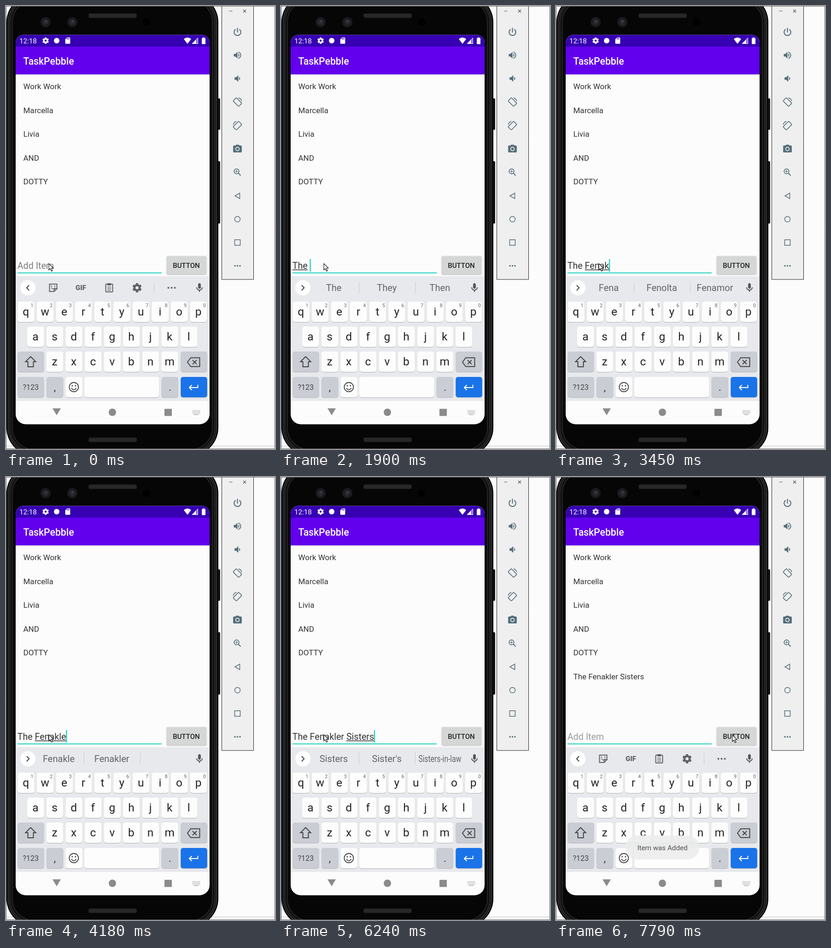
These frames come from a looping animation (584 px wide and 959 px high, 8000 ms). An HTML page with a canvas:

```html
<!DOCTYPE html>
<html lang="en">
<head>
<meta charset="utf-8">
<title>Adding an item to a list</title>
<style>
html, body { margin: 0; width: 100%; height: 100%; overflow: hidden; background: #fcfcfc; }
canvas { display: block; }
</style>
</head>
<body>
<canvas id="stage" width="584" height="959"></canvas>
<script>
const ctx = document.getElementById('stage').getContext('2d');
const LOOP = 8000;
const TAU = Math.PI * 2;
const PAPER = '#fcfcfc', INK = '#333333', GREY = '#5f6368', TEAL = '#1fd1c0', SLATE = '#546e7a';

// [time, field text, suggestions (null = icon toolbar), underline last word]
const STEPS = [
  [-940, '', null, 0],
  [1300, 'T', null, 0],
  [1420, 'T', ['T', 'The', 'This'], 1],
  [1540, 'Th', ['T', 'The', 'This'], 1],
  [1660, 'The', ['Th', 'The', 'This'], 1],
  [1780, 'The', ['The', 'They', 'Then'], 1],
  [1900, 'The ', ['The', 'They', 'Then'], 1],
  [2050, 'The F', ['same', 'first', 'best'], 0],
  [2330, 'The F', ['F', 'First', 'Fellow'], 1],
  [2730, 'The Fe', ['F', 'First', 'Fellow'], 1],
  [2850, 'The Fen', ['Fe', 'FE', 'Fennel'], 1],
  [2970, 'The Fen', ['Fen', 'Fence', 'Fennel'], 1],
  [3210, 'The Fena', ['Fen', 'Fence', 'Fennel'], 1],
  [3330, 'The Fena', ['Fena', 'Fenolta', 'Fenamor'], 1],
  [3450, 'The Fenak', ['Fena', 'Fenolta', 'Fenamor'], 1],
  [3570, 'The Fenak', ['Fenak', 'Fenolta', 'Fenamor'], 1],
  [3690, 'The Fenakl', ['Fenak', 'Fenolta', 'Fenamor'], 1],
  [3940, 'The Fenakle', ['Fenakl', 'Fenolta', 'Fenamor'], 1],
  [4060, 'The Fenakle', ['Fenakle', 'Fenakler', 'Fenamor'], 1],
  [4180, 'The Fenakle', ['Fenakle', 'Fenakler', ''], 1],
  [4330, 'The Fenakler', ['', 'Fenakler', ''], 1],
  [4630, 'The Fenakler ', ['', 'Fenakler', ''], 0],
  [4750, 'The Fenakler S', ['', 'Fenakler', ''], 1],
  [4870, 'The Fenakler S', ['S', 'A', 'So'], 1],
  [4990, 'The Fenakler Si', ['S', 'A', 'So'], 1],
  [5140, 'The Fenakler Sis', ['Si', 'SI', 'Since'], 1],
  [5390, 'The Fenakler Sist', ['Sis', 'SIS', 'Sister'], 1],
  [5640, 'The Fenakler Siste', ['Sist', 'Sister', 'Sisters'], 1],
  [5880, 'The Fenakler Sister', ['Sister', 'Sisters', "Sister's"], 1],
  [6120, 'The Fenakler Sisters', ['Sister', 'Sisters', "Sister's"], 1],
  [6240, 'The Fenakler Sisters', ['Sisters', "Sister's", 'Sisters-in-law'], 1],
  [7180, '', null, 0],
];
const POINTER = [[0, 92.5, 557], [6610, 203, 545], [6760, 346, 545], [6910, 382.5, 558]];
const ITEMS = ['Work Work', 'Marcella', 'Livia', 'AND', 'DOTTY'];
const ADDED = 'The Fenakler Sisters';

const ICONS = {
  power: 'M16.56 5.44l-1.45 1.45C16.84 7.94 18 9.83 18 12c0 3.31-2.69 6-6 6s-6-2.69-6-6c0-2.17 1.16-4.06 2.88-5.12L7.44 5.44C5.36 6.88 4 9.28 4 12c0 4.42 3.58 8 8 8s8-3.58 8-8c0-2.72-1.36-5.12-3.44-6.56zM13 3h-2v10h2z',
  louder: 'M3 9v6h4l5 5V4L7 9zm13.5 3c0-1.77-1.02-3.29-2.5-4.03v8.05c1.48-.73 2.5-2.25 2.5-4.02zM14 3.23v2.06c2.89.86 5 3.54 5 6.71s-2.11 5.85-5 6.71v2.06c4.01-.91 7-4.49 7-8.77s-2.99-7.86-7-8.77z',
  quieter: 'M18.5 12c0-1.77-1.02-3.29-2.5-4.03v8.05c1.48-.73 2.5-2.25 2.5-4.02zM5 9v6h4l5 5V4L9 9z',
  camera: 'M9 2L7.2 4H4c-1.1 0-2 .9-2 2v12c0 1.1.9 2 2 2h16c1.1 0 2-.9 2-2V6c0-1.1-.9-2-2-2h-3.2L15 2zM12 7a5 5 0 0 1 0 10a5 5 0 0 1 0-10zM12 8.8a3.2 3.2 0 0 0 0 6.4a3.2 3.2 0 0 0 0-6.4z',
  mic: 'M12 14c1.66 0 3-1.34 3-3V5c0-1.66-1.34-3-3-3S9 3.34 9 5v6c0 1.66 1.34 3 3 3zm5-3c0 2.76-2.24 5-5 5s-5-2.24-5-5H5c0 3.53 2.61 6.43 6 6.92V21h2v-3.08c3.39-.49 6-3.39 6-6.92z',
  card: 'M18 2h-8L4 8v12c0 1.1.9 2 2 2h12c1.1 0 2-.9 2-2V4c0-1.1-.9-2-2-2zM9 8h2V4H9zM12.2 8h2V4h-2zM15.4 8h2V4h-2z',
};
for (const name in ICONS) ICONS[name] = new Path2D(ICONS[name]);

const latest = (list, t) => list.filter(s => s[0] <= t).pop();

function box(x, y, w, h, r, fill, stroke, width = 1) {
  ctx.beginPath();
  ctx.roundRect(x, y, w, h, r);
  paint(fill, stroke, width);
}
function paint(fill, stroke, width = 1) {
  if (fill) { ctx.fillStyle = fill; ctx.fill(); }
  if (stroke) { ctx.strokeStyle = stroke; ctx.lineWidth = width; ctx.stroke(); }
}
function disc(x, y, r, fill, stroke, width) {
  ctx.beginPath();
  ctx.arc(x, y, r, 0, TAU);
  paint(fill, stroke, width);
}
// Points are relative to (x, y).
function poly(x, y, pts, fill, stroke, width, open) {
  ctx.beginPath();
  pts.forEach(([px, py]) => ctx.lineTo(x + px, y + py));
  if (!open) ctx.closePath();
  paint(fill, stroke, width);
}
const line = (x, y, pts, color, width) => poly(x, y, pts, null, color, width, true);
function text(s, x, y, size, color, { weight = 400, align = 'left', max } = {}) {
  ctx.font = `${weight} ${size}px Roboto, sans-serif`;
  ctx.textAlign = align;
  ctx.fillStyle = color;
  ctx.fillText(s, x, y, max);
}
function icon(name, x, y, size, color) {
  ctx.save();
  ctx.translate(x - size / 2, y - size / 2);
  ctx.scale(size / 24, size / 24);
  ctx.fillStyle = color;
  ctx.fill(ICONS[name], 'evenodd');
  ctx.restore();
}
function gear(x, y, r, color) {
  disc(x, y, r * .56, null, color, r * .46);
  for (let i = 0; i < 6; i++) {
    const a = i * TAU / 6 + TAU / 12, c = Math.cos(a), s = Math.sin(a);
    line(x, y, [[c * r * .7, s * r * .7], [c * r, s * r]], color, r * .5);
  }
}
function dots(x, y, gap, r, color) {
  for (let i = -1; i <= 1; i++) disc(x + i * gap, y, r, color);
}

function phone() {
  box(0, 0, 584, 959, 0, PAPER);
  line(0, 952.5, [[0, 0], [584, 0]], '#c4c4c4', 1);
  box(458, 200, 7, 68, 2, '#181818');
  box(458, 336, 7, 135, 2, '#181818');
  box(1, -25, 460, 998, 60, '#000');
  box(4.5, -21.5, 453, 991, 56, '#161616', '#3c3c3c', 1.5);
  box(8.5, -17.5, 445, 983, 52, '#111', '#333', 1.5);
  box(14, -12, 434, 972, 47, '#060606', '#2c2c2c', 1.5);
  for (const y of [16, 934]) {
    box(179, y, 105, 10, 4, '#222');
    for (let x = 182; x < 282; x += 3) box(x, y + 2, 1, 6, 0, '#333');
  }
  for (const x of [86, 144]) {
    disc(x, 35, 11, '#1b1b1f');
    disc(x, 35, 6, '#29292f');
    disc(x + 1, 33, 2.5, '#3b3b45');
  }
  disc(305, 35, 8, '#000');
}

function emulatorPanel() {
  const x = 502.5;
  box(468.5, -5, 69, 597, 0, '#efefef', '#222');
  line(488, 11, [[-3.5, 0], [3.5, 0]], '#555', 1);
  for (const k of [-1, 1]) line(518, 11, [[-3, -3 * k], [3, 3 * k]], '#555', 1.2);
  icon('power', x, 56.5, 25, SLATE);
  icon('louder', x, 106.5, 21.5, SLATE);
  icon('quieter', x, 157, 21.5, SLATE);
  [[208, 1], [259, -1]].forEach(([y, flip]) => {
    ctx.save();
    ctx.translate(x, y);
    ctx.scale(flip, 1);
    ctx.rotate(-TAU / 8);
    box(-5, -8.5, 10, 17, 1.5, null, SLATE, 1.7);
    ctx.beginPath();
    ctx.arc(0, 0, 9.5, -.55, .55);
    paint(null, SLATE, 1.4);
    ctx.restore();
  });
  icon('camera', x, 309.5, 22.5, SLATE);
  disc(500.5, 358, 5.3, null, SLATE, 1.7);
  line(500.5, 358, [[4, 4], [9, 9]], SLATE, 2);
  line(500.5, 358, [[-3, 0], [3, 0]], SLATE, 1.2);
  line(500.5, 358, [[0, -3], [0, 3]], SLATE, 1.2);
  poly(x, 411, [[-5.5, 0], [5, -6], [5, 6]], null, SLATE, 1.5);
  disc(x, 461.5, 6, null, SLATE, 1.5);
  box(x - 6, 506, 12, 12, 0, null, SLATE, 1.5);
  dots(x, 562.5, 5.5, 1.7, SLATE);
}

function statusBar() {
  box(21, 62.5, 421, 25.5, [17, 17, 0, 0], '#3700b3');
  box(21, 88, 421, 60, 0, '#6200ee');
  text('12:18', 29, 80.5, 15.2, '#fff');
  gear(86, 75, 7, '#fff');
  disc(110, 75, 6, '#fff');
  icon('card', 134, 75, 16, '#fff');
  ctx.beginPath();
  ctx.moveTo(394, 82);
  ctx.lineTo(386, 71.5);
  ctx.quadraticCurveTo(394, 65, 402, 71.5);
  paint('#fff');
  poly(417, 82, [[0, 0], [-13, 0], [0, -13.5]], 'rgba(255,255,255,.35)');
  poly(413, 82, [[0, 0], [-9, 0], [0, -9.3]], '#fff');
  line(417, 82, [[-.5, 0], [-.5, -13], [-13, -.5], [0, -.5]], '#fff', 1);
  box(425, 69.5, 8, 13, 1, '#fff');
  box(427, 68, 4, 2, 0, '#fff');
  text('TaskPebble', 37.5, 126.5, 21.2, '#fff', { weight: 500 });
}

function content(t, step) {
  const shade = ctx.createLinearGradient(0, 148, 0, 152);
  shade.addColorStop(0, 'rgba(0,0,0,.1)');
  shade.addColorStop(1, 'rgba(0,0,0,0)');
  box(21, 148, 421, 4, 0, shade);
  const items = t < 7180 ? ITEMS : [...ITEMS, ADDED];
  items.forEach((item, i) => text(item, 37.5, 180.3 + i * 51.5, 17.05, INK));

  const [since, value, , underlined] = step;
  const size = 19.65, x = 24.8, base = 569;
  if (value) text(value, x, base, size, INK);
  else text('Add Item', x, base, size, t < 120 ? '#7d7d7d' : '#9c9c9c');
  ctx.font = `400 ${size}px Roboto, sans-serif`;
  const width = s => ctx.measureText(s).width;
  if (underlined) {
    const word = value.trimEnd();
    const from = width(word.slice(0, word.lastIndexOf(' ') + 1));
    box(x + from, 570.6, width(word) - from, 1.4, 0, INK);
  }
  box(25, 576.8, 313, 2, 0, TEAL);
  if ((t - since) % 1060 < 530) box(x + width(value) - .3, 548, 2.3, 27, 0, TEAL);

  ctx.save();
  ctx.shadowColor = 'rgba(0,0,0,.3)';
  ctx.shadowBlur = 3;
  ctx.shadowOffsetY = 1;
  box(349, 541.5, 86, 39, 2, t >= 7060 && t < 7420 ? '#c4c5c5' : '#d5d6d6');
  ctx.restore();
  text('BUTTON', 391.5, 566.5, 15, '#222', { weight: 500, align: 'center' });
}

function toolbar(words) {
  const y = 610, dir = words ? 1 : -1;
  disc(47.5, y, 16.5, '#fff');
  line(47.5, y, [[-2.7 * dir, -5.5], [2.7 * dir, 0], [-2.7 * dir, 5.5]], '#444', 2);
  icon('mic', 420, y, 24, '#55585c');
  if (words) {
    if (words[0]) for (const x of [169.5, 291.5]) line(x, 597, [[0, 0], [0, 25]], '#c9cbd0', 1);
    words.forEach((w, i) => text(w, 114.5 + i * 115.2, 617, 20, GREY, { align: 'center', max: 93 }));
    return;
  }
  line(102.5, y, [[8, 2], [8, -8], [-8, -8], [-8, 8], [2, 8], [8, 2], [2, 2], [2, 8]], GREY, 2);
  disc(99, 606.5, 1.3, GREY);
  disc(106, 606.5, 1.3, GREY);
  ctx.beginPath();
  ctx.arc(102.5, 608.5, 4, .2, TAU / 2 - .2);
  paint(null, GREY, 1.6);
  text('GIF', 162.5, 615, 15, GREY, { weight: 900, align: 'center' });
  box(216.5, 602, 15, 17, 1.5, null, GREY, 2);
  box(220, 600, 8, 5, 1, GREY);
  for (const d of [-1.5, 2, 5.5]) line(224, y + d, [[-4, 0], [4, 0]], GREY, 1.4);
  gear(284.5, y, 10, GREY);
  line(321.5, 598, [[0, 0], [0, 24]], '#c9cbd0', 1);
  dots(359.5, y, 7, 2, GREY);
}

function key(x, y, w, fill = '#fdfdfd') {
  box(x, y + 1.3, w, 44, 5, '#b9bbc0');
  box(x, y, w, 44, 5, fill);
}

function keyboard(words, upper) {
  const dim = '#cacdd4', pitch = 41.6;
  box(21, 585, 421, 270, 0, '#e8e9ed');
  toolbar(words);
  [['qwertyuiop', 43.5, 640], ['asdfghjkl', 64.3, 694], ['zxcvbnm', 105.9, 748]].forEach(([row, x0, y]) => {
    [...row].forEach((c, i) => {
      const x = x0 + i * pitch;
      key(x - 18.3, y, 36.6);
      text(upper ? c.toUpperCase() : c, x - .3, y + 29.5, 24.5, '#222', { align: 'center' });
      if (y === 640) text((i + 1) % 10, x + 13, 652, 10.5, GREY, { align: 'center' });
    });
  });

  key(25.3, 748, 57.5, dim);
  poly(53.5, 770, [[0, -11], [11, 0], [6, 0], [6, 11], [-6, 11], [-6, 0], [-11, 0]], upper ? '#444' : null, '#444', 2);
  key(379.3, 748, 57.5, dim);
  poly(407, 771, [[-13, 0], [-6, -9.5], [13.5, -9.5], [13.5, 9.5], [-6, 9.5]], null, '#444', 2);
  for (const k of [-1, 1]) line(409.5, 771, [[-4.5, -4.5 * k], [4.5, 4.5 * k]], '#444', 2);

  key(25.3, 803, 57.5, dim);
  text('?123', 53.8, 831, 16, '#444', { align: 'center' });
  key(87.8, 803, 36.6, dim);
  text(',', 106, 833, 22, '#333', { align: 'center' });
  key(129.3, 803, 36.6);
  disc(147.3, 825, 10, null, '#444', 1.8);
  disc(143.8, 822, 1.5, '#444');
  disc(150.8, 822, 1.5, '#444');
  ctx.beginPath();
  ctx.arc(147.3, 825.5, 5.2, .25, TAU / 2 - .25);
  paint(null, '#444', 1.8);
  key(170, 803, 162.5);
  key(337.5, 803, 36.6, dim);
  text('.', 355.8, 833, 22, '#333', { align: 'center' });
  key(379.3, 803, 57.5, '#1a73e8');
  line(407, 826, [[9.5, -6], [9.5, 0], [-8, 0]], '#fff', 2);
  line(407, 826, [[-3.5, -5.5], [-9, 0], [-3.5, 5.5]], '#fff', 2);
}

function navBar() {
  const grey = '#8b8b8b';
  poly(110, 871, [[-9, 0], [9, 0], [0, 15]], grey);
  disc(231, 879.5, 8, grey);
  box(344, 872, 16, 15.5, 1, grey);
  for (let row = 0; row < 3; row++)
    for (let i = 0; i < 6; i++) box(405 + i * 2.9, 875 + row * 2.9, 1.7, 1.7, 0, '#aaa');
  box(408, 883.8, 10, 1.5, 0, '#aaa');
}

function toast(alpha) {
  ctx.globalAlpha = alpha;
  box(151, 776, 160, 52, 26, '#ebebec');
  text('Item was Added', 231, 807.5, 15.2, '#333', { align: 'center' });
  ctx.globalAlpha = 1;
}

function pointer([, x, y]) {
  poly(x, y, [[.5, .5], [.5, 14.5], [3.7, 11.5], [6, 17], [8.5, 16], [6.2, 10.7], [10.3, 10.4]], '#fff', '#111', 1.1);
}

function draw(t) {
  const step = latest(STEPS, t), words = step[2];
  phone();
  box(21, 62.5, 421, 843, [17, 17, 22, 22], PAPER);
  statusBar();
  content(t, step);
  keyboard(words, t >= 1180 && t < 1300);
  navBar();
  if (t >= 7670) toast(t < 7790 ? .4 : .85);
  emulatorPanel();
  pointer(latest(POINTER, t));
  box(.5, .5, 583, 958, 0, null, '#6a6a6a');
}

const start = performance.now();
function frame() {
  draw((performance.now() - start) % LOOP);
  requestAnimationFrame(frame);
}
frame();
</script>
</body>
</html>
```
